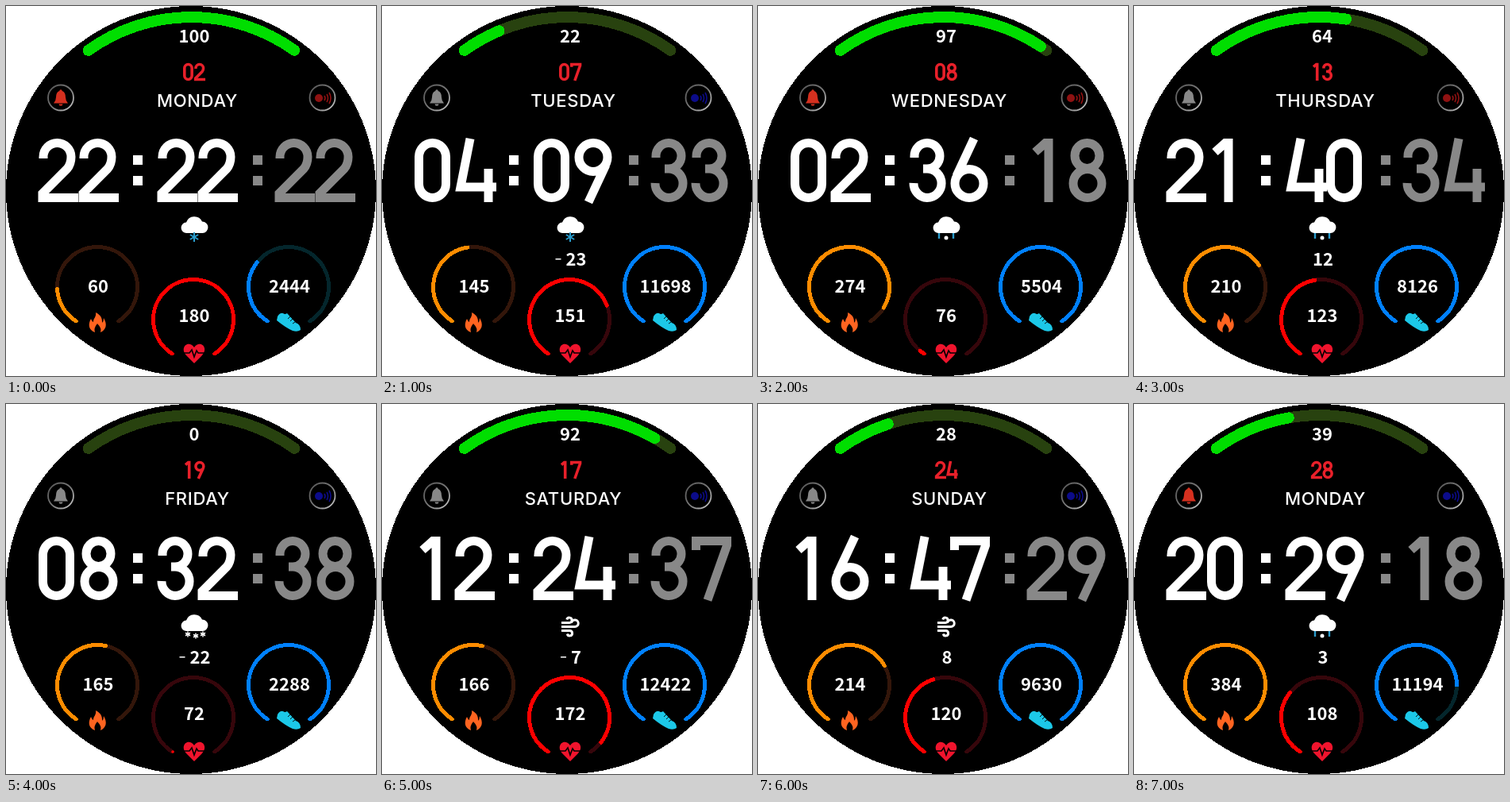
Animation, 466 px wide and 466 px high, one loop 8000 ms. Source, as an HTML page:

```html
<!DOCTYPE html>
<html lang="en">
<head>
<meta charset="utf-8">
<style>
  html, body { margin: 0; width: 100%; height: 100%; overflow: hidden; background: #fff; }
  svg { display: block; width: 466px; height: 466px; }
  .value { font: 700 22px "Noto Sans CJK SC", "Noto Sans", sans-serif; fill: #fff; }
  .day { font: 500 22px Inter, sans-serif; letter-spacing: .7px; fill: #fff; }
</style>
</head>
<body>
<svg viewBox="0 0 466 466">
  <defs>
    <linearGradient id="rim" x1="0" y1="0" x2="1" y2="1">
      <stop offset="0" stop-color="#555"/>
      <stop offset=".5" stop-color="#777"/>
      <stop offset="1" stop-color="#ccc"/>
    </linearGradient>
  </defs>
  <circle cx="233" cy="233" r="233" shape-rendering="crispEdges"/>
  <g id="face"></g>
  <g fill="none" stroke="url(#rim)" stroke-width="1.8">
    <circle cx="69" cy="115.500" r="16"/>
    <circle cx="398.500" cy="115.500" r="16"/>
  </g>
  <path fill="#ff6420" d="M113 386C121 390 121 395 121 399Q123 397 123 393C128 401 126 408 119 411Q121 406 115 400Q110 406 112 411C104 408 103 401 107 394Q108 397 110 398C110 393 114 392 113 386Z"/>
  <path fill="#1cc8e8" d="M342 391Q345 386 349 387Q351 389 354 387L365 399Q371 401 371 408Q367 411 361 409Q352 405 341 396Z"/>
  <path stroke="#000" stroke-width=".9" d="M355 394l3-3M358 397l3-3M361 400l3-2"/>
  <path fill="#f0142d" d="M237 450L227 440C218 430 230 420 237 430C244 420 256 430 247 440Z"/>
  <path fill="none" stroke="#000" stroke-width="1.6" d="M224 437h7l3-4 3 9 3-8 2 3h8"/>
</svg>
<script>
const RED = '#d5301f', GRAY = '#888';
const keys = ['day', 'date', 'time', 'battery', 'kcal', 'pulse', 'steps', 'stepsEnd', 'sky', 'temp', 'bell', 'linked'];
const states = [
  ['MONDAY', '02', '222222', 100, 60, 180, 2444, 128, 'snow', null, 1, 0],
  ['TUESDAY', '07', '040933', 22, 145, 151, 11698, 328, 'snow', -23, 0, 1],
  ['WEDNESDAY', '08', '023618', 97, 274, 76, 5504, 328, 'rain', null, 1, 0],
  ['THURSDAY', '13', '214034', 64, 210, 123, 8126, 328, 'rain', 12, 0, 0],
  ['FRIDAY', '19', '083238', 0, 165, 72, 2288, 328, 'flakes', -22, 0, 1],
  ['SATURDAY', '17', '122437', 92, 166, 172, 12422, 328, 'wind', -7, 0, 1],
  ['SUNDAY', '24', '164729', 28, 214, 120, 9630, 328, 'wind', 8, 0, 1],
  ['MONDAY', '28', '202918', 39, 384, 108, 11194, 270, 'rain', 3, 1, 1],
].map(row => Object.fromEntries(row.map((v, i) => [keys[i], v])));

// Centre lines of the digits in a 51 x 80 cell
const glyphs = {
  0: 'M6.5 23a17 17.5 0 0 1 34 0V57a17 17.5 0 0 1-34 0Z',
  1: 'M11 17L24 5.5H28V80',
  2: 'M7 25V23A17.5 17.5 0 0 1 42 23Q42 32 37 38L6 69V74.5H51',
  3: 'M7 24V22A16 16.5 0 0 1 39 22A16 16 0 0 1 23 38H18M23 38A18 18.2 0 0 1 23 74.5A18 18 0 0 1 6 56',
  4: 'M20 0L8 61H53M43 38V80',
  6: 'M31 0L9 47M43 56.5a18 18 0 1 1-36 0a18 18 0 1 1 36 0',
  7: 'M6.5 17V5.5H45.5V11L21 80',
  8: 'M41 21.5a15.5 16 0 1 1-31 0a15.5 16 0 1 1 31 0M44 56.5a18 18 0 1 1-36 0a18 18 0 1 1 36 0',
  9: 'M19 80L41 33M43 23.5a18 18 0 1 1-36 0a18 18 0 1 1 36 0',
};

const number = (text, x, y, color, scale = 1, weight = 11) =>
  `<g transform="translate(${x} ${y}) scale(${scale})" fill="none" stroke="${color}" stroke-width="${weight}">` +
  [...text].map((d, i) => `<path transform="translate(${i * 51})" d="${glyphs[d]}"/>`).join('') + '</g>';

const label = (text, x, y, kind = 'value', anchor = 'middle') =>
  `<text class="${kind}" x="${x}" y="${y}" text-anchor="${anchor}">${text}</text>`;

// Angles in degrees, clockwise from straight down
function arc(cx, cy, r, from, to, color, width) {
  const point = a => {
    const t = a * Math.PI / 180;
    return `${cx - r * Math.sin(t)} ${cy + r * Math.cos(t)}`;
  };
  return `<path d="M${point(from)}A${r} ${r} 0 ${+(to - from > 180)} 1 ${point(to)}" fill="none" stroke="${color}" stroke-width="${width}" stroke-linecap="round" shape-rendering="crispEdges"/>`;
}

const ring = (cx, cy, end, color, dim) =>
  arc(cx, cy, 50.5, 32, 328, dim, 5) +
  (end > 32 ? arc(cx, cy, 50.5, 32, Math.min(end, 328), color, 5)
            : `<circle cx="${cx - 26}" cy="${cy + 43}" r="1.8" fill="${color}"/>`);

const colon = (x, color) =>
  `<path fill="${color}" d="M${x} 188h12v12h-12zM${x} 214h12v12h-12z"/>`;

const flake = (x, y, r, color, width) =>
  [0, 60, 120].map(a => `<path transform="rotate(${a} ${x} ${y})" d="M${x} ${y - r}v${2 * r}" stroke="${color}" stroke-width="${width}"/>`).join('');

const cloud = '<path fill="#fff" d="M227.5 286a6.7 6.7 0 0 1-.5-13.4a10.8 10.8 0 0 1 20-1a7.2 7.2 0 0 1 .5 14.4z"/>';
const skies = {
  snow: cloud + flake(237, 291, 6, '#2a9ccc', 2),
  rain: cloud + '<path stroke="#2a9ccc" stroke-width="2.4" d="M228 286v7M246 286v7"/><circle cx="237" cy="292" r="2.5" fill="#fff"/>',
  flakes: cloud + flake(229, 290, 3.5, '#fff', 1.5) + flake(239, 292, 3.5, '#fff', 1.5) + flake(248, 290, 3.5, '#fff', 1.5),
  wind: '<path fill="none" stroke="#fff" stroke-width="3" d="M226 275.500h10a3.200 3.200 0 1 0-3.200-4M226 280.500h17a4.300 4.300 0 1 0-4.300-5M226 285.500h10.500a3.200 3.200 0 1 1-3.200 4"/>',
};

function temperature(t) {
  if (t === null) return '';
  const digits = String(Math.abs(t)), minus = t < 0 ? 13 : 0;
  const x = 238 - (digits.length * 13 + minus) / 2;
  return (minus ? `<path fill="#fff" d="M${x} 318h7v1.5h-7z"/>` : '') + label(digits, x + minus, 327, 'value', 'start');
}

const bell = color =>
  `<path fill="${color}" d="M67.300 107a1.700 1.700 0 0 1 3.400 0Q75 108.500 75 115Q75 119 78 122.500H60Q63 119 63 115Q63 108.500 67.300 107zM66.500 123.500h5a2.500 2.300 0 0 1-5 0z"/>`;

const wireless = color =>
  `<circle cx="394" cy="116" r="5" fill="${color}"/>` +
  `<path fill="none" stroke="${color}" stroke-width="1.6" d="M401 113q2 3 0 6M404 111q3 5 0 10M407 109q4 7 0 14"/>`;

function battery(level) {
  const band = (to, color) => arc(233.5, 236, 222, 144.2, to, color, 14);
  return band(215.8, '#28420f') + (level ? band(140.7 + .75 * level, '#00de00') : '');
}

const draw = s =>
  battery(s.battery) + label(s.battery, 237, 45.5) +
  number(s.date, 223, 72, '#e8202a', .275, 13) + label(s.day, 241, 127, 'day') +
  bell(s.bell ? RED : GRAY) + wireless(s.linked ? '#0c0c8a' : '#8f1212') +
  number(s.time.slice(0, 2), 40, 167, '#fff') + colon(160, '#fff') +
  number(s.time.slice(2, 4), 190, 167, '#fff') + colon(311, GRAY) +
  number(s.time.slice(4), 338, 167, GRAY) +
  skies[s.sky] + temperature(s.temp) +
  ring(115, 354, 27 + s.kcal, '#ff8c00', '#33160a') + label(s.kcal, 116, 361) +
  ring(236, 395, 28 + 2.8 * (s.pulse - 72), '#f00', '#36060b') + label(s.pulse, 237, 398) +
  ring(356, 354, s.stepsEnd, '#0080ff', '#04262c') + label(s.steps, 357, 361);

const face = document.getElementById('face');
let shown = -1;
function tick() {
  const index = Math.floor(performance.now() / 1000) % states.length;
  if (index !== shown) face.innerHTML = draw(states[shown = index]);
  requestAnimationFrame(tick);
}
tick();
</script>
</body>
</html>
```
